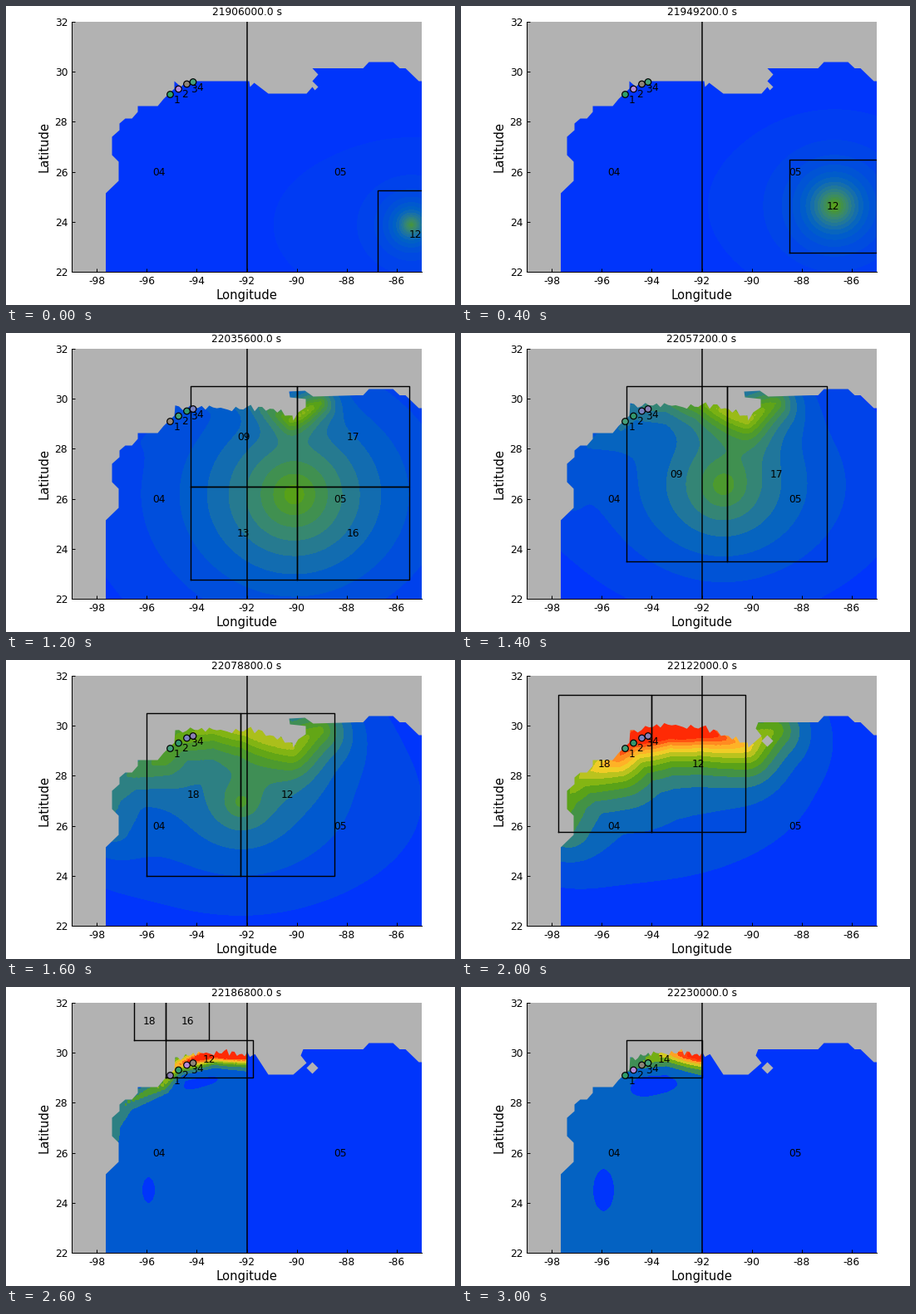
A matplotlib script that plays this animation: 540x360 px, repeating every 3.2 s.

```python
from itertools import cycle

import numpy as np
import matplotlib.pyplot as plt
from matplotlib.animation import FuncAnimation
from matplotlib.colors import LinearSegmentedColormap

FRAMES, INTERVAL = 16, 200
W, H = 540, 360
LEFT, TOP, WIDTH, HEIGHT = 79, 19, 421, 301
PT = 0.72  # points per pixel at 100 dpi
LAND = "#b2b2b2"
plt.rcParams["font.family"] = "DejaVu Sans"

SURGE = LinearSegmentedColormap.from_list("surge", [
    (0, "#0035fb"), (.08, "#004be0"), (.15, "#0060c6"), (.2, "#1a71a6"),
    (.28, "#38886f"), (.35, "#45943f"), (.42, "#58a118"), (.5, "#7eb312"),
    (.6, "#bcc41e"), (.68, "#f0ce26"), (.75, "#feb928"), (.86, "#ff8720"),
    (1, "#ff2a05")])


def lon(x):
    """Longitude of a pixel centre."""
    return -99 + (np.asarray(x) - .5 - LEFT) * 14 / WIDTH


def lat(y):
    return 32 - (np.asarray(y) - .5 - TOP) * 10 / HEIGHT


def pts(*v):
    return np.array(v, float).reshape(-1, 2)


# --- coastline: coarse key points, refined by a jagged arc ---
WEST = pts(78, 322, 120.5, 322, 120.5, 226, 136, 211, 136, 188, 128, 180,
           128, 158, 137, 150, 137, 142, 144, 136, 152, 136, 159, 128,
           159, 121, 183, 121, 190, 112.5, 203, 100)
EAST = pts(422, 75.5, 430, 75.5, 437, 68, 466, 68, 474, 75.5, 481, 75.5,
           497, 91, 502, 91, 502, 18, 78, 18)
COARSE = pts(203, 91, 211, 98, 217, 91, 293, 91, 294, 98, 299, 93)
BAY = pts(316, 106, 346, 106)
CAPE = pts(362, 106, 369, 98, 372, 102, 376, 98, 369, 91, 376, 83, 369, 75.5)
INLET = pts(352, 96, 361, 90, 361, 80, 342, 78, 341, 71, 360, 70, 370, 77)
LAGOON = pts(362, 92, 355, 83, 358, 75.5)
ISLET = pts(362, 98, 369, 91, 376, 98, 369, 105)
JAG = np.random.default_rng(3).uniform(-4, 4, 32)


def coast(k):
    if k < 6:
        return np.vstack([WEST, COARSE, BAY, CAPE, EAST])
    x = np.linspace(204, 345 if k < 12 else 300, JAG.size)
    crest = np.interp(k, [6, 10], [91, 79])
    arc = np.maximum(79 + .0032 * (x - 258) ** 2, crest) + JAG
    bay = BAY if k >= 12 else BAY[1:]
    tail = INLET if k < 9 else LAGOON
    return np.vstack([WEST, np.column_stack([x, arc]), bay, tail, EAST])


# --- storm and surge, as tracks over key steps ---
KEYS = [0, 4, 6, 8, 10, 13, 15]
TRACKS = dict(
    eye=[.33, .5, .4, .24, 0, 0, 0],
    size=[20, 38, 95, 40, 40, 40, 40],
    swell=[.035, .03, .06, .15, .18, 0, 0],
    surge=[0, 0, .35, .5, 1.22, 1.4, 1.2],
    peak=[310, 310, 310, 245, 198, 205, 235],
    spread=[45, 45, 45, 150, 97, 60, 45],
    depth=[16, 16, 16, 34, 34, 9, 13],
    west=[-86.75, -90, -94.25, -96, -97.75, -95.25, -95],
    east=[-83.75, -86, -85.5, -88.5, -90.25, -91.75, -92],
    south=[21.75, 23.75, 22.75, 24, 25.75, 29, 29],
    north=[25.25, 27.5, 30.5, 30.5, 31.25, 30.5, 30.5])
NAMES = dict(zip(KEYS, ["12", "10", "09 17 13 16", "18 12", "18 12",
                        "12", "14"]))

X, Y = np.meshgrid(np.arange(119, 503, 1.5), np.arange(60, 324, 1.5))
SHORE = pts(128, 205, 130, 165, 145, 140, 190, 118, 205, 95, 250, 80,
            290, 84, 345, 105, 365, 92, 378, 85)
along = np.r_[0, np.cumsum(np.hypot(*np.diff(SHORE, axis=0).T))]
S = np.linspace(0, along[-1], 60)
DIST = np.array([np.hypot(X - x, Y - y) for x, y in
                 zip(*(np.interp(S, along, c) for c in SHORE.T))])


def gauss(x, y, rx, ry):
    return np.exp(-((X - x) / rx) ** 2 - ((Y - y) / ry) ** 2)


def at(name, k):
    return np.interp(k, KEYS, TRACKS[name])


def water(k):
    ex, ey = 488 - 17 * k - 1.08 * k ** 2, 264 - 11.5 * k
    z = .005 + at("swell", k) * gauss(ex, ey, 220, 130)
    z += at("eye", k) * np.exp(-np.hypot(X - ex, Y - ey) / at("size", k))

    # each shore point spreads its own surge; the highest wins
    profile = 1 / (1 + ((S - at("peak", k)) / at("spread", k)) ** 2)
    reach = np.log(profile)[:, None, None] - (DIST / at("depth", k)) ** 1.3
    z += at("surge", k) * np.exp(reach.max(axis=0))

    # after landfall the western half stays high, with a low coastal fringe
    calm = np.clip((k - 10) / 3, 0, 1)
    fringe = gauss(215, 112 - .15 * (X - 215), 75, 20)
    pool = gauss(172, 245, 11, 22)
    z = np.where(X < 290, z + calm * (.18 - .1 * fringe - .1 * pool),
                 z * (1 - .9 * calm))
    return np.clip(z, .001, 1.25), .025 + .0006 * k ** 2


def patches(k):
    """Refined meshes as (names, x edges, y edges), on a quarter-degree grid."""
    def edges(lo, hi, limit):
        lo, hi = (np.round(4 * at(n, k)) / 4 for n in (lo, hi))
        mid = [np.round(2 * (lo + hi)) / 4] if hi - lo > limit else []
        return [lo, *mid, hi]

    names = NAMES[max(n for n in KEYS if n <= k)]
    out = [(names, edges("west", "east", 6.5), edges("south", "north", 7.5))]
    if k in (12, 13):
        out.append(("18 16", [-96.5, -95.25, -93.5], [30.5, 32.05]))
    return out


# --- stage ---
fig = plt.figure(figsize=(W / 100, H / 100), dpi=100, facecolor="white")
ax = fig.add_axes([LEFT / W, 1 - (TOP + HEIGHT) / H, WIDTH / W, HEIGHT / H],
                  facecolor=LAND)
ax.set(xlim=(-99, -85), ylim=(22, 32), xticks=range(-98, -85, 2),
       yticks=range(22, 33, 2), axisbelow=False)
ax.xaxis.set_major_formatter(lambda v, _: f"{v:.0f}")
ax.tick_params(direction="in", length=4 * PT, width=PT, pad=3.5,
               labelsize=12.3 * PT)
for side, spine in ax.spines.items():
    spine.set_visible(side in ("left", "bottom"))
    spine.set_linewidth(PT)


def label(x, y, s, size=12.2, **kw):
    """Text centred on its digits."""
    drop = .365 * size * 10 / HEIGHT
    return ax.text(x, y - drop, s, fontsize=size * PT, ha="center",
                   va="baseline", zorder=6, **kw)


def land(shape):
    return ax.fill(lon(shape[:, 0]), lat(shape[:, 1]), fc=LAND, lw=0,
                   zorder=2)


title = label(-92, lat(7.2), "")
label(-92, lat(347.7), "Longitude", 14.8)
ax.text(lon(46.5), 27, "Latitude", fontsize=14.8 * PT, rotation=90,
        ha="center", va="center")
ax.plot([-92, -92], [22, 32], "k", lw=1.5 * PT, zorder=4)
label(-95.5, 26, "04")
label(-88.25, 26, "05")

GAUGES = pts(198, 107, 208, 100.5, 218, 94.5, 225.5, 92)
GAUGE_COLORS = ["#33976e", "#7a82c0", "#8a7fb4", "#2f9f6a", "#b48ad8",
                "#8f8578", "#459f7a"]
for n, (gx, gy) in enumerate(GAUGES, 1):
    label(lon(gx + 8), lat(gy + 6), str(n))
gauges = ax.scatter(lon(GAUGES[:, 0]), lat(GAUGES[:, 1]), s=(7.6 * PT) ** 2,
                    ec="black", lw=1.2 * PT, zorder=5)
live = []


def draw_patch(names, xs, ys):
    names = cycle(names.split())
    for y0, y1 in reversed(list(zip(ys, ys[1:]))):
        for x0, x1 in zip(xs, xs[1:]):
            live.extend(ax.plot([x0, x1, x1, x0, x0], [y0, y0, y1, y1, y0],
                                "k", lw=1.4 * PT, zorder=4))
            live.append(label((x0 + x1) / 2, (y0 + y1) / 2, next(names),
                              clip_on=True))


def update(k):
    while live:
        live.pop().remove()
    title.set_text(f"{21906000 + 21600 * k:.1f} s")
    z, step = water(k)
    levels = np.arange(0, z.max() + step, step)
    live.append(ax.contourf(lon(X), lat(Y), z, levels=levels, zorder=1,
                            colors=SURGE(np.minimum(levels[:-1], 1))))
    live.extend(land(coast(k)))
    if k >= 9:
        live.extend(land(ISLET))
    count = 0
    for names, xs, ys in patches(k):
        draw_patch(names, xs, ys)
        count += (len(xs) - 1) * (len(ys) - 1)
    gauges.set_facecolor([GAUGE_COLORS[(3 * count + i) % 7]
                          for i in range(4)])
    return live


anim = FuncAnimation(fig, update, frames=FRAMES, interval=INTERVAL,
                     repeat=True, repeat_delay=0, blit=False)
plt.show()
```
